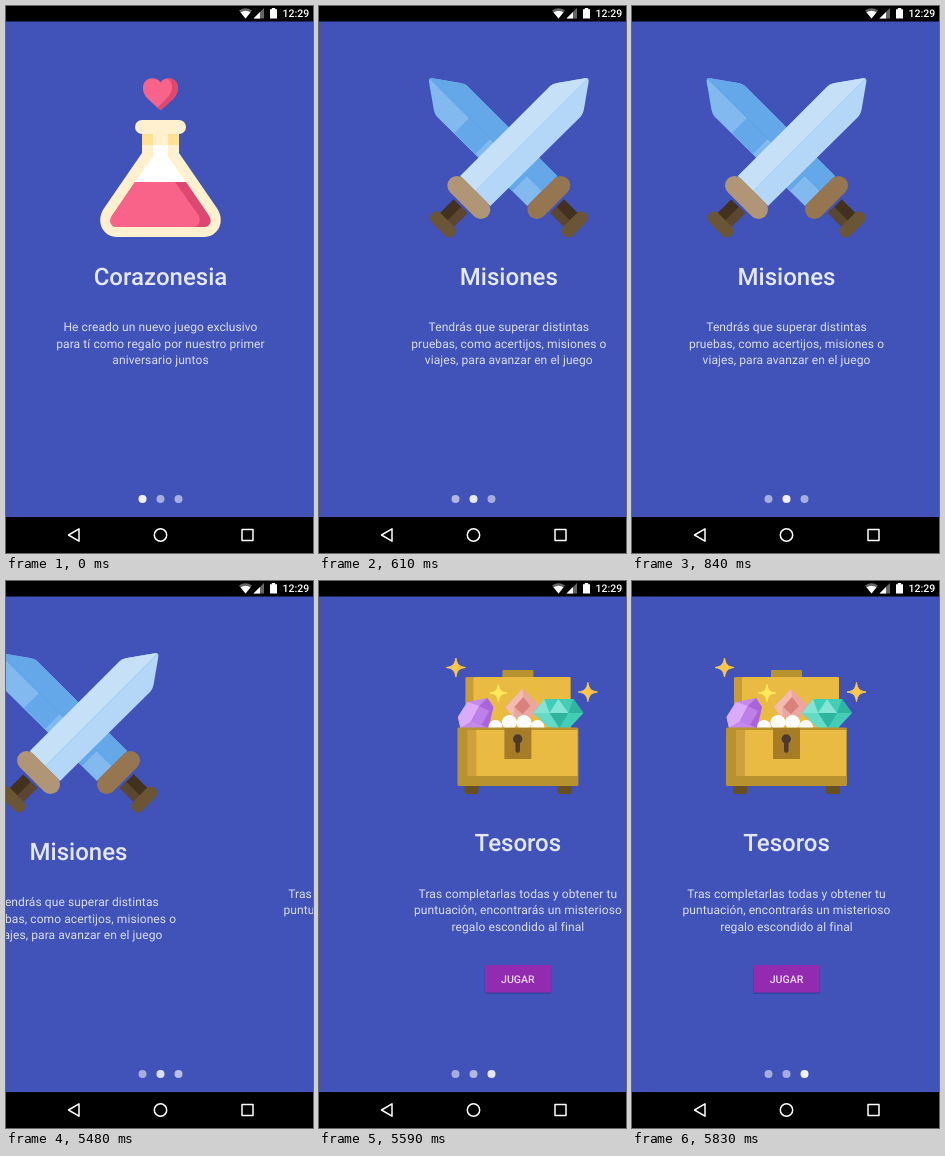
Animation of 307x547 px, one loop 8000 ms. Source, as an HTML page:

```html
<!DOCTYPE html>
<html lang="es">
<head>
<meta charset="utf-8">
<title>Intro</title>
<style>
  html, body { margin: 0; width: 100%; height: 100%; overflow: hidden; background: #4153b8; }
  svg { display: block; width: 307px; height: 547px; }
  text { font-family: Roboto, sans-serif; text-rendering: geometricPrecision; }
  .title { font-size: 24px; font-weight: 500; fill: #e4e7f5; text-anchor: middle; }
  .body { font-size: 12px; letter-spacing: .09px; fill: #dadef1; text-anchor: middle; }
  .button { font-size: 10.6px; font-weight: 500; fill: #ecdcf3; text-anchor: middle; }
  .clock { font-size: 10.5px; font-weight: 500; fill: #fff; }
</style>
</head>
<body>
<svg viewBox="0 0 307 547">
  <defs>
    <g id="blade">
      <path d="M231 72.3Q235 71.5 234.3 76L229.5 104Q228 110 224 113L136 200L106 170L194 82Q197 78 203 77Z"/>
    </g>
    <path id="bladeTop" d="M233.5 72.6Q232.5 72 231 72.3L203 77Q197 78 194 82L106 170L121 185Z"/>
    <g id="grip" fill="none">
      <path d="M106 200L90 216" stroke="#433120" stroke-width="19"/>
      <path d="M110 204L94 220" stroke="#5b4630" stroke-width="9"/>
      <path d="M82 212L95 225" stroke="#6a5537" stroke-width="13" stroke-linecap="round"/>
    </g>
    <path id="guard" d="M102.5 179.5L126.5 203.5" stroke-width="19" stroke-linecap="round"/>
    <path id="star" d="M0-9.5C1.3-2.8 2.8-1.3 9.5 0C2.8 1.3 1.3 2.8 0 9.5C-1.3 2.8-2.8 1.3-9.5 0C-2.8-1.3-1.3-2.8 0-9.5Z" stroke-width="1" stroke-linejoin="round"/>
  </defs>

  <rect width="307" height="547" fill="#4153b8"/>

  <g class="page">
    <path fill="#f9638a" d="M154.5 104Q152 102.500 141.500 92.500C133.500 84 137 72.300 146 72.300Q151.500 72.300 154.500 76.500Q157.500 72.300 163 72.300C172 72.300 175.500 84 167.500 92.500Q157 102.500 154.500 104Z"/>
    <path fill="#dc4870" d="M160.500 72.500C167 75 168.500 84 162 91Q156 97.500 151.500 101.500L154.500 104Q157 102.500 167.500 92.500C175.500 84 172 72.300 163 72.300Z"/>
    <path fill="#fff0d0" d="M136 122H173V147L211.500 203C219.500 216 212 231 198 231H111C97 231 89.500 216 97.500 203L136 147Z"/>
    <path fill="#fee195" d="M136 128H147V139H136ZM162 128H173V139H162Z"/>
    <rect x="129" y="114" width="51" height="14" rx="7" fill="#fff0d0"/>
    <path fill="#fff" d="M147 139H162V150.500L180 176H129L147 150.500Z"/>
    <path fill="#dc4870" d="M129 176H180L202.500 209C207 215 204 221 198 221H111C105 221 102 215 106.500 209Z"/>
    <path fill="#f9638a" d="M129 176H169L192 208.500C196 214.500 193 221 186 221H111C105 221 102 215 106.500 209Z"/>
    <text class="title" x="154.500" y="279">Corazonesia</text>
    <text class="body" x="154.500" y="325">He creado un nuevo juego exclusivo</text>
    <text class="body" x="154.500" y="341.700">para tí como regalo por nuestro primer</text>
    <text class="body" x="154.500" y="358">aniversario juntos</text>
  </g>

  <g class="page">
    <g transform="matrix(-1 0 0 1 309 0)">
      <use href="#grip"/>
      <use href="#blade" fill="#82b9ef"/>
      <use href="#bladeTop" fill="#65a8e9"/>
      <path d="M179 97L209 127L188 148L158 118Z" fill="#65a8e9"/>
      <path d="M136 170L151 155L166 170L151 185Z" fill="#65a8e9"/>
      <path d="M233 73L121 185" stroke="#5b9fe2" stroke-width=".8"/>
      <use href="#guard" stroke="#957651"/>
    </g>
    <use href="#grip"/>
    <use href="#blade" fill="#b4d7f7"/>
    <use href="#bladeTop" fill="#c6e0f8"/>
    <path d="M233 73L121 185" stroke="#a2cbf2" stroke-width=".8"/>
    <use href="#guard" stroke="#b09676"/>
    <text class="title" x="154.500" y="279">Misiones</text>
    <text class="body" x="154.500" y="325">Tendrás que superar distintas</text>
    <text class="body" x="154.500" y="341.700">pruebas, como acertijos, misiones o</text>
    <text class="body" x="154.500" y="358">viajes, para avanzar en el juego</text>
  </g>

  <g class="page">
    <rect x="139" y="89" width="31" height="9" rx="1" fill="#b8922f"/>
    <rect x="130" y="96" width="77" height="52" rx="1" fill="#c89c34"/>
    <rect x="102" y="96" width="105" height="52" rx="1.500" fill="#c89c34"/>
    <rect x="110" y="96" width="97" height="52" rx="1.500" fill="#eabb42"/>

    <path fill="#eaa69f" d="M142 126L159 108L176 124L168 137H150Z"/>
    <path fill="#f2bcb3" d="M142 126L159 108L160 116L151 126L150 137Z"/>
    <path fill="#d9827b" d="M160 116L167 125L159 133L151 126Z"/>

    <path fill="#c38aec" d="M94.500 136L104 121L124 117L130 126L125 147H97Z"/>
    <path fill="#dcabf8" d="M94.500 136L104 121L116 125L108 140L97 147Z"/>
    <path fill="#a964dc" d="M116 125L124 117L130 126L125 147L108 140Z"/>
    <path fill="#bd80ea" d="M116 125L126 130L118 144L108 140Z"/>

    <path fill="#44cdb6" d="M170 132L181 118H210L220 132L206 147H186Z"/>
    <path fill="#83e5d4" d="M170 132L181 118L186 132ZM195 118L205 132H186Z"/>
    <path fill="#2eb49f" d="M210 118L220 132H205ZM186 132H205L196 147Z"/>
    <path fill="#64dac8" d="M170 132H186L196 147H186Z"/>

    <g fill="#fff">
      <circle cx="132" cy="146" r="7"/><circle cx="174" cy="146" r="7"/>
      <circle cx="146" cy="141.500" r="7.500"/><circle cx="160.500" cy="141.500" r="7.500"/>
    </g>

    <path fill="#66501f" d="M101 204H115V211Q115 213 113 213H103Q101 213 101 211ZM194 204H208V211Q208 213 206 213H196Q194 213 194 211Z"/>
    <rect x="94" y="146.500" width="121" height="58.500" rx="1.500" fill="#b8922f"/>
    <rect x="104" y="149" width="110" height="46" fill="#cfa13a"/>
    <rect x="113" y="149" width="101" height="46" fill="#eabb42"/>
    <rect x="141" y="147" width="27" height="31" fill="#a77c27"/>
    <circle cx="154.300" cy="158" r="4.700" fill="#4d3a2c"/>
    <path d="M154.300 160V169.500" stroke="#4d3a2c" stroke-width="4.500" stroke-linecap="round"/>

    <use href="#star" x="92.500" y="86.500" fill="#fec64b" stroke="#fec64b"/>
    <use href="#star" x="224.500" y="111" fill="#fec64b" stroke="#fec64b"/>
    <use href="#star" transform="translate(135 112) scale(.9)" fill="#ffe95c" stroke="#ffe95c"/>

    <text class="title" x="154.500" y="269.500">Tesoros</text>
    <text class="body" x="154.500" y="317">Tras completarlas todas y obtener tu</text>
    <text class="body" x="154.500" y="333">puntuación, encontrarás un misterioso</text>
    <text class="body" x="154.500" y="349.700">regalo escondido al final</text>
    <rect x="121" y="385.500" width="67" height="27.500" rx="2" fill="#2b3990" opacity=".55"/>
    <rect x="121.500" y="384" width="66" height="27.500" rx="1.500" fill="#932bb0"/>
    <text class="button" x="154.500" y="401.500">JUGAR</text>
  </g>

  <g fill="#fff">
    <circle class="dot" cx="136.500" cy="493" r="4"/>
    <circle class="dot" cx="154.500" cy="493" r="4"/>
    <circle class="dot" cx="172.500" cy="493" r="4"/>
  </g>

  <path d="M0 0H307V15.500H0ZM0 511H307V547H0Z"/>
  <g fill="#fff">
    <path d="M233 4.500Q239.500 0 246 4.500L239.500 12.500Z" opacity=".4"/>
    <path d="M234.500 6.300Q239.500 3.300 244.500 6.300L239.500 12.500Z"/>
    <path d="M258 2V12.500H247.500Z" opacity=".4"/>
    <path d="M254 6V12.500H247.500Z"/>
    <path d="M264 3.200H265.800V2H269.200V3.200H271V12.500H264Z"/>
    <text class="clock" x="276.500" y="11.300">12:29</text>
  </g>
  <g fill="none" stroke="#fff" stroke-width="1.500" stroke-linejoin="round">
    <path d="M62.500 529L73 522.800V535.200Z"/>
    <circle cx="154.500" cy="529" r="6.200"/>
    <rect x="236" y="523.500" width="11" height="11"/>
  </g>
</svg>
<script>
const LOOP = 8000, WIDTH = 309, FIRST_LEFT = 227;
const pages = document.querySelectorAll('.page');
const dots = document.querySelectorAll('.dot');

// Each swipe holds its picture between ticks and settles on a quintic ease-out.
const swipes = [
  { ticks: [500, 560, 610, 670, 730, 780, 840], end: 854 },
  { ticks: [5480, 5540, 5590, 5650, 5710, 5770, 5830], end: 5875 }
];

function travelled({ ticks, end }, t) {
  if (t < ticks[0]) return 0;
  if (t >= ticks[ticks.length - 1]) return WIDTH;
  const held = ticks.filter(tick => tick <= t).pop();
  return WIDTH - FIRST_LEFT * ((end - held) / (end - ticks[0])) ** 5;
}

function draw(t) {
  const scroll = swipes.reduce((sum, swipe) => sum + travelled(swipe, t), 0);
  pages.forEach((page, i) => page.setAttribute('transform', `translate(${i * WIDTH - scroll} 0)`));
  dots.forEach((dot, i) => {
    const near = Math.max(0, 1 - Math.abs(i - scroll / WIDTH));
    dot.setAttribute('opacity', 0.53 + 0.39 * near);
  });
}

const start = performance.now();
function tick() {
  draw((performance.now() - start) % LOOP);
  requestAnimationFrame(tick);
}
draw(0);
requestAnimationFrame(tick);
</script>
</body>
</html>
```
